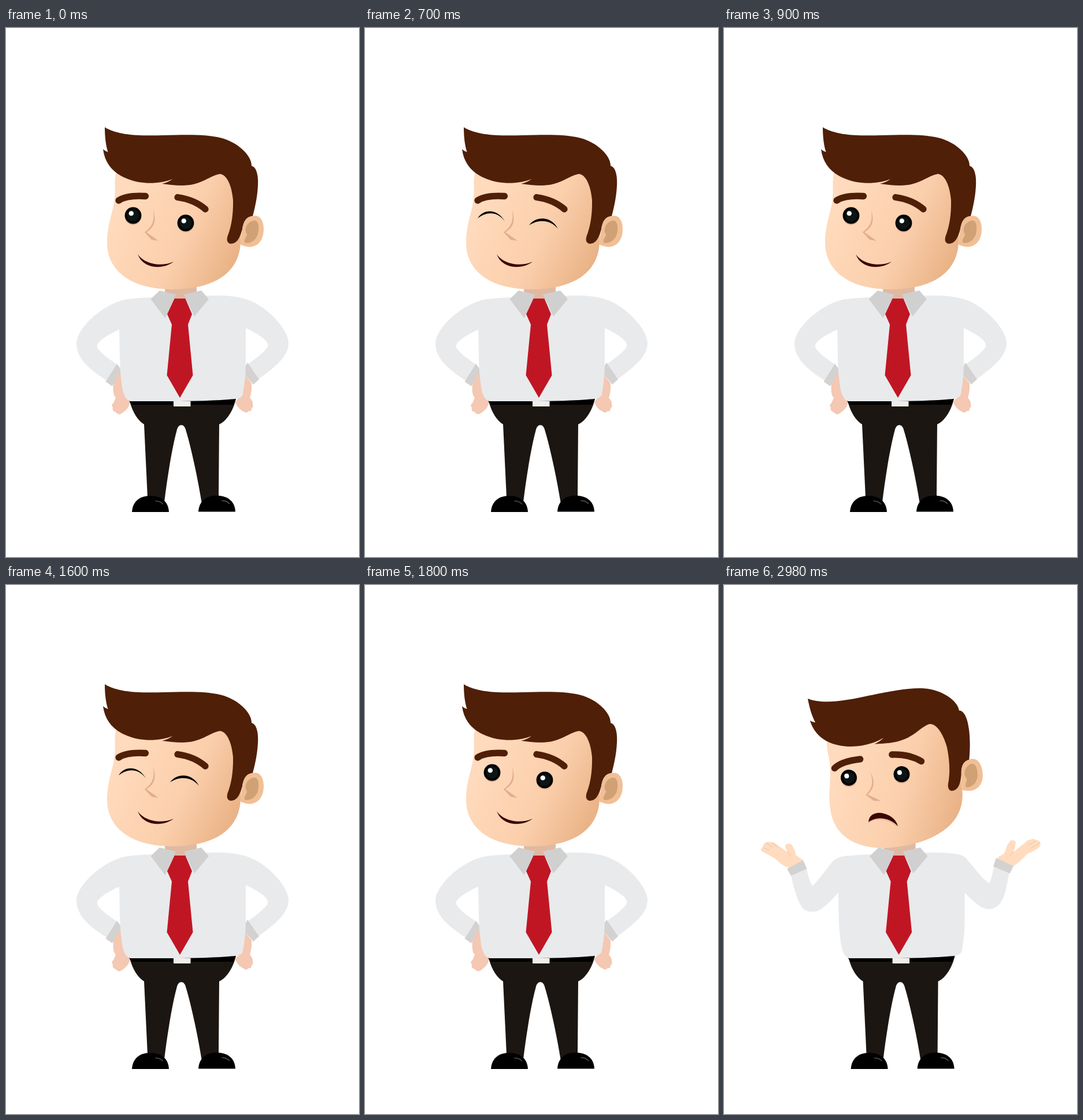
An HTML page that plays this animation: 611x917 px, repeating every 3300 ms.

```html
<!DOCTYPE html>
<html lang="en">
<head>
<meta charset="utf-8">
<title>Shrugging man</title>
<style>
html, body { margin: 0; width: 100%; height: 100%; overflow: hidden; background: #fff; }
svg { display: block; width: 611px; height: 917px; }
.shirt { fill: #e9eaec; }
.cuff { fill: #d3d2d1; }
.hand { fill: #f4c8b2; }
.palm { fill: #ffdcbf; }
.crease { fill: none; stroke: #f3c9a8; stroke-width: 1.2; stroke-linecap: round; }
.brow { fill: none; stroke: #4f1f07; stroke-width: 11.3; stroke-linecap: round; }
.mouth { fill: #390606; }
.lip { fill: none; stroke: #eab097; stroke-width: 1.5; stroke-linecap: round; }
.shine { fill: none; stroke: #4d4d4d; stroke-width: 1.6; stroke-linecap: round; }
</style>
</head>
<body>
<svg viewBox="0 0 611 917">
  <defs>
    <linearGradient id="skin" gradientUnits="userSpaceOnUse" x1="205" y1="300" x2="398" y2="395">
      <stop offset="0" stop-color="#ffdabc"/>
      <stop offset=".55" stop-color="#fbcfac"/>
      <stop offset="1" stop-color="#eab387"/>
    </linearGradient>
    <g id="eye">
      <circle cy="2.6" r="14" fill="#e6b395"/>
      <circle r="14.4" fill="#000"/>
      <circle r="10.5" fill="#0d1414"/>
      <circle cx="-3.2" cy="-3.6" r="4.2" fill="#fff"/>
    </g>
    <g id="shoe">
      <path d="M0 28C1 11 12 0 31 0C50 0 63 9 64 28Z"/>
      <path class="shine" d="M41 9Q49 9 53.500 14"/>
    </g>
  </defs>

  <g id="hips">
    <path class="hand" d="M186 617L198 594L206 634L215 647C214 658 206 664 200 668Q195 672 190 666Q183 664 185 658Q181 654 186 650L190 641Q184 635 186 617Z"/>
    <path class="hand" d="M413 601L425 616Q426 630 422 641Q428 647 427 653Q429 657 425 659Q426 665 420 664Q416 669 412 665C404 662 399 655 397 648L408 635Z"/>
    <path class="shirt" d="M212 470C174 474 122 518 122 547C122 570 140 590 176 612L192 583C180 575 161 562 158 553C155 545 175 532 198 522Z"/>
    <path class="shirt" d="M396 467C440 467 489 520 489 546C489 568 470 585 434 611L418 583C430 575 450 560 453 552C456 543 440 532 413 519Z"/>
    <path class="cuff" d="M192 582L200 593L184 621L172.500 613ZM418 580L438 609L428 618L413 601V589Z"/>
  </g>

  <g id="shrug">
    <path class="shirt" d="M216 469C195 471 190 476 182 487C172 500 160 515 153 522Q147 512 143 492L116 503C122 530 128 552 138 562C146 568 158 568 168 562C180 553 190 543 200 530Z"/>
    <path class="shirt" d="M398 466C412 468 417 470 421 476C435 493 450 512 459 517Q464 508 467 489L494 498C489 520 487 545 474 556C464 564 452 563 443 557C432 548 422 540 414 530Z"/>
    <path class="palm" d="M114 494L112 490C100 486 95 480 88 474Q72 465 66 462Q61 458 67 455Q67 449 72 447Q77 443 82 447Q86 444 90 449L110 463Q106 456 106 451Q110 446 117 450Q124 460 124 468L136 476L138 482Z"/>
    <path class="palm" d="M473 478L475 471Q487 466 487 460Q490 450 496 443Q502 441 505 446Q504 455 501 463Q510 455 520 448Q525 441 532 441Q538 439 541 443Q546 442 547 446Q549 452 545 455Q538 461 525 466Q515 478 503 486L498 490Z"/>
    <path class="crease" d="M67 455L78 460M72 447L85 455M82 447L93 454M110 463L115 469M541 443L527 451M547 447L531 456M501 463L495 469"/>
    <path class="cuff" d="M109 492L137 477L143.500 492L116 504ZM471 473L501 487L495 500L466 488Z"/>
  </g>

  <g id="body">
    <path fill="#1c1612" d="M214 647C220 668 228 680 239 687L245 814L274 822C279 780 288 725 295.500 698C298 685 309 685 311.500 698C319 722 331 775 339 825L368 815L369 687C380 683 393 665 398 643Z"/>
    <path d="M213 646L398 642L393 653L217 653Z"/>
    <use href="#shoe" x="218" y="811"/>
    <use href="#shoe" x="333" y="810.4"/>
    <path class="shirt" d="M196 474C212 468 232 468 251 467L350 464C375 463 395 464 411 469L415 480V580C415 605 412 623 410 634C409 642 400 643 384 644C330 648 270 647 216 647C207 646 202 634 200 615C196 585 197 550 196 523Z"/>
    <path fill="#e0b9a3" d="M275 448H330V458L311 470H291L275 460Z"/>
    <path fill="#d0d0d0" d="M266 455L294 462L275.500 503L250.500 470ZM338 455L351 470L326 500L308 462Z"/>
    <path fill="#c01624" d="M291.500 469H310.500L322 496L315 514L323.500 602L301 641L278.500 602L287 514L279 496Z"/>
    <rect x="290" y="647" width="29.500" height="9" fill="#efeee9"/>
  </g>

  <g id="head">
    <path fill="url(#skin)" d="M192 245C186 262 190 275 188 295C186 318 175 340 175 372C175 425 222 453 288 453C362 453 406 423 406 368L410 330L400 240Z"/>
    <path fill="#4f1f07" d="M171 172C195 187 235 187 270 186C315 185 345 184 372 190.500C402 198 426 222 425 239C434 241 437 256 436 274C435 295 430 315 427 326C416 327 411 335 409 349C404 366 399 374 389 374C382 373 381 366 385 357C391 340 393.500 320 393 298C391 275 383 254 370 253C352 256 338 273 305 273C292 273 280 271 270 270Q280 268 288 262C270 269 250 270.500 229 267C196 260 172 243 168 210Q172 214 176.500 215C173 204 171 190 171 172Z"/>
    <path fill="#f1bf95" d="M427 326C440 323 446 335 446 348C446 370 434 380 420 379.500C414 379 409 377 405 375L409 349C411 335 416 327 427 326Z"/>
    <path fill="#d1a176" d="M428 334C437 332 439 345 436 357C432 370 420 375 413 372C411 366 418 361 417 357C412 352 415 337 428 334Z"/>
    <path fill="#e2ad8e" d="M255 316C260 333 258 345 243 354L264 369L252 367L240 354C254 344 257 335 255 316Z"/>
    <path class="brow" d="M195 299Q209 289.500 241.500 291.500"/>
    <path class="brow" d="M297 293.500Q326 297.500 345 314"/>
  </g>

  <g id="open">
    <use href="#eye" x="220" y="325"/>
    <use href="#eye" x="311" y="338"/>
  </g>
  <path id="closed" d="M195 330C204 313.500 229 312 242 335C229 318 211 317.500 195 330ZM284 342C295 326 322 325 334 348C321 332 300 331 284 342Z"/>
  <path id="smile" class="mouth" d="M228 392C239 409 268 415 290 405C275 418 238 420 228 392Z"/>
  <g id="sad">
    <use href="#eye" transform="translate(216 334) rotate(-10.3) scale(.97)"/>
    <use href="#eye" transform="translate(307.5 328) rotate(-10.3) scale(.97)"/>
    <path class="lip" d="M251 411C265 401.500 288 406 299 418"/>
    <path class="mouth" d="M250 411C251 400 258 395 270 395C284 396 298 405 301 418C288 404.500 266 399.500 250 411Z"/>
  </g>
</svg>
<script>
const LOOP = 3300, CYCLE = 900, BLINK = 700, SHRUG = 2500;
const $ = id => document.getElementById(id);
const show = (id, on) => $(id).setAttribute('display', on ? 'inline' : 'none');

function draw(t) {
  const shrug = t >= SHRUG;
  const blink = !shrug && t % CYCLE >= BLINK;
  show('hips', !shrug);
  show('smile', !shrug);
  show('open', !shrug && !blink);
  show('closed', blink);
  show('shrug', shrug);
  show('sad', shrug);
  $('body').setAttribute('transform', `translate(${shrug ? 1.6 : 0} 0)`);
  $('head').setAttribute('transform',
    shrug ? 'translate(145 197) rotate(-10.3) translate(-171 -172)' : '');
}

const start = performance.now();
function tick() {
  draw((performance.now() - start) % LOOP);
  requestAnimationFrame(tick);
}
tick();
</script>
</body>
</html>
```
